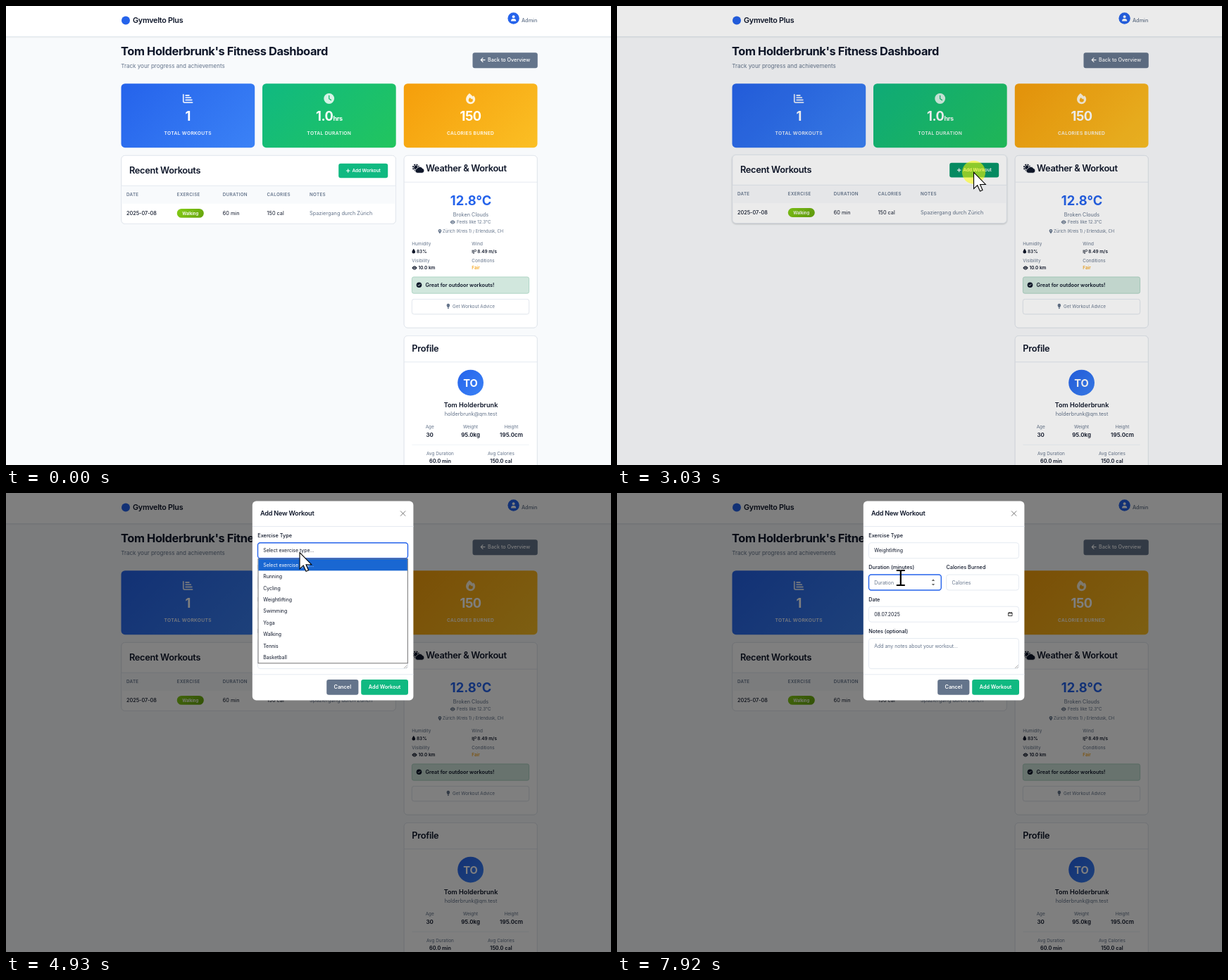
Write an HTML page that moves like this. It is 859 px wide and 652 px high and loops after 8 s.

```html
<!DOCTYPE html>
<html lang="en">
<head>
<meta charset="utf-8">
<title>Fitness Dashboard</title>
<style>
html, body { margin: 0; width: 100%; height: 100%; overflow: hidden; background: #f8fafc; }
svg { display: block; font-family: Inter, sans-serif; font-optical-sizing: none; fill: #0f172a; }
text { white-space: pre; }
.w5 { font-weight: 500; } .w6 { font-weight: 600; } .w7 { font-weight: 700; }
.mid { text-anchor: middle; }
.tight { letter-spacing: -.025em; } .wide { letter-spacing: .05em; }
.grey { fill: #64748b; } .white { fill: #fff; } .blue { fill: #2563eb; } .amber { fill: #f59e0b; }
.line { fill: none; stroke: #e2e8f0; stroke-width: .9; }
.box { fill: #fff; stroke: #e2e8f0; stroke-width: .9; }
.card > .box { filter: drop-shadow(0 .5px .7px #0002); }
.card.up { transform: translateY(-.9px); }
.card.up > .box { filter: drop-shadow(0 1.8px 1.2px #0003); }
.ring { stroke: #2563eb; stroke-width: 1.4; }
.pen { fill: none; stroke-linecap: round; stroke-linejoin: round; }
</style>
</head>
<body>
<svg id="stage" width="859" height="652" viewBox="0 0 859 652"></svg>
<script>
const stage = document.getElementById('stage');
const LOOP = 8000;

const text = (x, y, size, cls, s, more = '') =>
  `<text x="${x}" y="${y}" font-size="${size}" class="${cls}" ${more}>${s}</text>`;
const rect = (x, y, w, h, r, attrs) =>
  `<rect x="${x}" y="${y}" width="${w}" height="${h}" rx="${r}" ${attrs}/>`;
const circle = (x, y, r, attrs = '') => `<circle cx="${x}" cy="${y}" r="${r}" ${attrs}/>`;
const path = (d, attrs = '') => `<path d="${d}" ${attrs}/>`;
const pen = (d, color, width) => path(d, `class="pen" stroke="${color}" stroke-width="${width}"`);
const hline = (x, y, w) => path(`M${x} ${y}h${w}`, 'class="line"');

// Diagonal gradient box with 45 degree colour bands
let gradients = 0;
function gradientBox(x, y, w, h, r, from, to) {
  const id = 'grad' + gradients++, cx = x + w / 2, cy = y + h / 2, d = (w + h) / 4;
  return `<linearGradient id="${id}" gradientUnits="userSpaceOnUse" x1="${cx - d}" y1="${cy - d}"
    x2="${cx + d}" y2="${cy + d}"><stop stop-color="${from}"/><stop offset="1" stop-color="${to}"/></linearGradient>`
    + rect(x, y, w, h, r, `fill="url(#${id})"`);
}

const eye = (x, y, color) =>
  path(`M${x - 3.7} ${y}q3.7-5.6 7.4 0q-3.7 5.6-7.4 0z`, `fill="${color}"`)
  + circle(x, y, 1.6, 'fill="#fff"') + circle(x, y, .9, `fill="${color}"`);

const stat = (x, from, to, label, value) =>
  gradientBox(x, 110.2, 189.7, 91, 5.5, from, to)
  + text(x + 94.8, 163.4, 18.3, 'w7 white mid tight', value)
  + text(x + 94.8, 183.3, 6.7, 'w6 white mid wide', label, 'opacity=".92"');

const header = () =>
  rect(-5, -5, 869, 48.5, 0, 'class="box" style="filter:drop-shadow(0 .5px 1px #0002)"')
  + circle(170, 20.5, 6, 'class="blue"')
  + text(180, 24.4, 10.8, 'w6 tight', 'Gymvelto Plus')
  + circle(720.6, 17.5, 8.2, 'class="blue"')
  + circle(720.6, 15.2, 1.9, 'class="white"')
  + path('M717 21.4q0-3.4 3.6-3.4t3.6 3.4z', 'class="white"')
  + text(732, 23.3, 7.3, 'w5 grey', 'Admin')
  + text(163, 70.2, 16.45, 'w7 tight', "Tom Holderbrunk's Fitness Dashboard")
  + text(163.2, 87.6, 8.04, 'grey', 'Track your progress and achievements')
  + rect(662.5, 66.3, 92.3, 21.9, 3.2, 'class="grey"')
  + pen('M680 76.6h-5.5M677 73.8l-2.8 2.8l2.8 2.8', '#fff', 1.2)
  + text(684, 79.2, 7.2, 'w5 white', 'Back to Overview');

const stats = () =>
  stat(163.5, '#2563eb', '#3b82f6', 'TOTAL WORKOUTS', '1')
  + `<g opacity=".85">${pen('M251.8 125.8v9.5q0 1.8 1.8 1.8h11M255.2 127h4.6M255.2 130.2h7M255.2 133.5h8.6', '#fff', 1.8)}</g>`
  + stat(364, '#10b981', '#22c55e', 'TOTAL DURATION', '1.0<tspan font-size="9.14" style="letter-spacing:-.46px">hrs</tspan>')
  + circle(458.7, 131.5, 7.4, 'fill="#fff" opacity=".82"')
  + pen('M458.7 127.3v4.4l2.8 1.9', '#18bd75', 1.3)
  + stat(564.8, '#f59e0b', '#fbbf24', 'CALORIES BURNED', '150')
  + path('M658 124q3 2.5 4.8 4.6l1.2-1.3q2.2 2.5 2.2 5.3a6.6 6.6 0 0 1-13.2 0q0-4.500 5-8.600z', 'fill="#fff" opacity=".85"')
  + path('M659.7 136.500a3 3 0 0 1-3-3q0-1.500 2-3.600l2.200 2.600l1-1.100q1 1.200 1 2.400a3 3 0 0 1-3.200 2.700z', 'fill="#f7aa14"');

const recent = () =>
  rect(163.9, 212.4, 389.4, 97, 5, 'class="box"')
  + text(175, 238.2, 12.8, 'w6 tight', 'Recent Workouts')
  + rect(472.2, 223.7, 70, 20.6, 3, 'id="add" fill="#10b981"')
  + pen('M483.400 234h4.600M485.700 231.700v4.600', '#fff', 1.1)
  + text(491.4, 236.200, 6.4, 'w6 white', 'Add Workout')
  + rect(164.4, 255.3, 388.5, 25.5, 0, 'fill="#f8fafc"') + hline(164, 255.300, 389)
  + [[171, 'DATE'], [242.800, 'EXERCISE'], [307.800, 'DURATION'], [370.600, 'CALORIES'], [431, 'NOTES']]
    .map(([x, s]) => text(x, 270.200, 6.25, 'w6 grey wide', s)).join('')
  + text(171, 297, 7.3, 'w5', '2025-07-08')
  + gradientBox(242.800, 288, 38, 12.800, 6.4, '#84cc16', '#65a30d')
  + text(261.700, 296.600, 5.9, 'w6 white mid', 'Walking')
  + text(307.800, 297, 7.3, '', '60 min') + text(370.600, 297, 7.3, '', '150 cal')
  + text(431, 297, 7.3, 'grey', 'Spaziergang durch Zürich');

const weather = () =>
  rect(565.2, 212.4, 189, 244.600, 5, 'class="box"') + hline(565.2, 250.200, 189)
  + circle(582, 229.500, 2.700) + circle(582, 229.500, 4.100, 'fill="none" stroke="#0f172a" stroke-width="2" stroke-dasharray="2 1.22"')
  + path('M584 237.300a3.300 3.300 0 0 1-.5-6.500a4.300 4.300 0 0 1 7.600-.4a3.500 3.500 0 0 1-.2 6.900z', 'stroke="#fff" stroke-width=".8"')
  + text(596, 235.300, 12.800, 'w6 tight', 'Weather &amp; Workout')
  + text(660, 282.600, 18.300, 'w7 blue mid', '12.8°C')
  + text(660, 299, 7.3, 'grey mid', 'Broken Clouds')
  + eye(634.200, 307, '#64748b') + text(640, 309.300, 6.300, 'grey', 'Feels like 12.3°C')
  + path('M616 323.500q-2.300-2.900-2.300-4.200a2.300 2.300 0 0 1 4.600 0q0 1.300-2.300 4.200z', 'class="grey"')
  + circle(616, 319.200, .8, 'class="white"')
  + text(620, 322.300, 5.85, 'grey', 'Zürich (Kreis 1) / Erlendusk, CH')
  + text(576.300, 340, 6.4, 'grey', 'Humidity') + text(661.300, 340, 6.4, 'grey', 'Wind')
  + path('M578.800 344.700q2.400 3 2.400 4.500a2.400 2.400 0 0 1-4.800 0q0-1.500 2.400-4.500z')
  + text(583, 350.500, 6.4, 'w6', '83%')
  + pen('M661.800 347.200h2.800M661.800 348.700h4.500a1.300 1.300 0 1 0-1-2M661.800 350.200h2.200a.7 .7 0 1 1-.6 1.100', '#0f172a', .8)
  + text(669.300, 350.500, 6.4, 'w6', '8.49 m/s')
  + text(576.300, 363.800, 6.4, 'grey', 'Visibility') + text(661.300, 363.800, 6.4, 'grey', 'Conditions')
  + eye(580, 372, '#0f172a') + text(585.500, 374.300, 6.4, 'w6', '10.0 km')
  + text(661.300, 374.300, 6.4, 'w5 amber', 'Fair')
  + rect(576.400, 384.900, 166.200, 23.300, 2.500, 'fill="#d1e7dd" stroke="#a3cfbb" stroke-width=".8"')
  + circle(586.500, 396.200, 3.800) + pen('M584.900 396.300l1.200 1.200l2.100-2.400', '#d1e7dd', .9)
  + text(595.500, 398.900, 7.3, 'w6', 'Great for outdoor workouts!')
  + rect(576.400, 416.500, 166.200, 21.200, 3, 'class="box"')
  + path('M626.700 428.200q0-1.200-.8-2a2.300 2.300 0 1 1 4 0q-.8 .8-.8 2zM626.800 428.800h2.200q0 1.400-1.100 1.400t-1.100-1.400z', 'class="grey"')
  + text(634, 429.200, 6.350, 'grey', 'Get Workout Advice');

const fact = (x, y, dy, size, label, value) =>
  text(x, y, 6.4, 'grey mid', label) + text(x, y + dy, size, 'w6 mid', value);

const profile = () =>
  rect(565.2, 468.5, 189, 210, 5, 'class="box"') + hline(565.2, 505.700, 189)
  + text(576.300, 491.300, 12.800, 'w6 tight', 'Profile')
  + gradientBox(641.2, 516.700, 36.800, 36.800, 18.400, '#2563eb', '#3b82f6')
  + text(659.600, 540.700, 14.620, 'w7 white mid', 'TO')
  + text(660, 570, 9.140, 'w6 mid', 'Tom Holderbrunk')
  + text(660, 582.300, 7.3, 'grey mid', 'holderbrunk@qm.test')
  + fact(601.700, 600, 11.700, 8.040, 'Age', '30') + fact(659.600, 600, 11.700, 8.040, 'Weight', '95.0kg')
  + fact(717.500, 600, 11.700, 8.040, 'Height', '195.0cm')
  + path('M576.400 623.300h166.200', 'class="line" opacity=".6"')
  + fact(616.500, 638.200, 10.800, 7.3, 'Avg Duration', '60.0 min')
  + fact(703, 638.200, 10.800, 7.3, 'Avg Calories', '150.0 cal');

const field = (id, x, y, w, h) => rect(x, y, w, h, 3.5, `id="${id}" class="box"`);
const options = ['Select exercise type...', 'Running', 'Cycling', 'Weightlifting', 'Swimming',
  'Yoga', 'Walking', 'Tennis', 'Basketball'];
const ROW = 16.4, LIST_TOP = 93.9;

const modal = () =>
  rect(349.8, 11.6, 228.600, 282.800, 5.5, 'class="white"')
  + text(361, 32.300, 9.140, 'w6 tight', 'Add New Workout')
  + pen('M560.300 25.800l6.600 6.600M566.900 25.800l-6.600 6.600', '#777', 1)
  + hline(350, 47.500, 228.500) + hline(350, 257.800, 228.500)
  + [[357.300, 62.900, 'Exercise Type'], [357.300, 108.300, 'Duration (minutes)'], [467.500, 108.300, 'Calories Burned'],
     [357.300, 153.900, 'Date'], [357.300, 199, 'Notes (optional)']]
    .map(([x, y, s]) => text(x, y, 7.3, 'w5', s)).join('')
  + field('select', 357.500, 70.700, 213, 22.100) + text(365.200, 84.300, 6.950, '', options[0], 'id="choice"')
  + field('duration', 357.500, 116, 102.800, 22) + text(365.200, 129.500, 6.950, 'grey', 'Duration')
  + path('M446.800 125l2.200-2.700l2.200 2.700zM446.800 128.900l2.200 2.700l2.200-2.700z', 'fill="#666"')
  + path('M365.200 122.500v9', 'id="caret" stroke="#0f172a" stroke-width=".7"')
  + field('calories', 467.700, 116, 102.800, 22) + text(475.500, 129.500, 6.950, 'grey', 'Calories')
  + field('date', 357.500, 161.200, 213, 22) + text(365.200, 174.700, 6.950, '', '08.07.2025')
  + pen('M556 170.200h5v4.300h-5zM557.200 169.300v.6M559.800 169.300v.6M556 170.700h5', '#111', .8)
  + field('notes', 357.500, 206.600, 213, 43) + text(365.200, 219.800, 6.950, 'grey', 'Add any notes about your workout...')
  + pen('M565.300 248.700l4.200-4.200M567.800 248.700l1.700-1.700', '#777', .6)
  + rect(455.2, 264.900, 45.200, 21.800, 3.200, 'class="grey"') + text(477.800, 277.800, 7.300, 'w6 white mid', 'Cancel')
  + rect(504.2, 264.900, 66.800, 21.800, 3.200, 'fill="#10b981"') + text(537.600, 277.800, 7.200, 'w6 white mid', 'Add Workout')
  + '<g id="list">' + rect(358, 93.600, 212.300, 148.200, 0, 'fill="#fff" stroke="#666" stroke-width=".9"')
  + rect(358.400, LIST_TOP, 211.500, ROW, 0, 'id="mark" fill="#1967d2"')
  + options.map((s, i) => text(365.200, LIST_TOP + 10.800 + i * ROW, 6.950, 'option', s)).join('') + '</g>';

const beamSide = s => `M${6 * s}-10.500H${1.5 * s}Q0-10.500 0-9V9Q0 10.500 ${1.5 * s} 10.500H${6 * s}`;
const pointers = () =>
  circle(0, 0, 16.6, 'id="flash" fill="#ff0" opacity=".55"')
  + path('M0 0V23.300L5.200 18.400L9 26.800L12.500 25.300L9 17.200H16.800Z', 'id="arrow" fill="#fff" stroke="#000" stroke-width="1.1"')
  + path('M-1 18V2.500C-1-.8 3.300-.8 3.300 2.500V11C4 9.500 7.200 9.800 7.300 12C8.500 10.700 11 11.300 11.300 13.500C12.500 12.500 15 13.300 15 15.800V22C15 28 11.500 31 6 31C1 31-1.500 29.500-4 25.500L-8.600 18C-9 15.800-6 14.800-4.300 16.300ZM3.300 11v5M7.300 12v4.500M11.300 13.500v4',
    'id="hand" fill="#fff" stroke="#000" stroke-width="1.1" stroke-linejoin="round"')
  + path(beamSide(-1) + beamSide(1), 'id="beam" fill="none" stroke="#000" stroke-width="2.2"');

const card = (id, content) => `<g id="${id}" class="card">${content}</g>`;
stage.innerHTML = rect(0, 0, 859, 652, 0, 'fill="#f8fafc"') + header() + stats()
  + card('recent', recent()) + card('weather', weather()) + card('profile', profile())
  + rect(0, 0, 859, 652, 0, 'id="shade" fill="#000"')
  + `<g id="modal">${modal()}</g><g id="pointer">${pointers()}</g>`;

const ui = {};
stage.querySelectorAll('[id]').forEach(el => ui[el.id] = el);
const rows = [...stage.querySelectorAll('.option')];

const linear = p => p, smooth = p => p * p * (3 - 2 * p), easeOut = p => 1 - (1 - p) ** 2;
// Pointer stops: time, x, y and the easing used to get there
const stops = [
  [640, 830, 427, linear], [1180, 273, 349.5, easeOut],
  [1900, 273, 349.5, linear], [2790, 506, 236, smooth],
  [3700, 508, 237, linear], [4070, 417.4, 118.4, linear], [4460, 417, 84.5, easeOut],
  [5400, 417, 84.5, linear], [5900, 399, 144, linear], [6030, 397, 150.5, easeOut],
  [6930, 397, 150.5, linear], [7500, 400, 127.5, smooth],
  [7919, 400, 127.5, linear], [7920, 402.800, 120.5, linear], [LOOP, 402.800, 120.5, linear]
];
const clicks = [[3030, 3250], [4780, 4930], [6360, 6500], [7430, 7500]];
const cardBoxes = { recent: [164, 212, 553, 309], weather: [565, 212, 754, 457], profile: [565, 468, 754, 652] };

const within = (t, [from, to]) => t >= from && t < to;
const show = (el, on) => el.setAttribute('visibility', on ? 'inherit' : 'hidden');

function pointerAt(t) {
  const i = Math.max(1, stops.findIndex(s => s[0] >= t));
  const [t0, x0, y0] = stops[i - 1], [t1, x1, y1, ease] = stops[i];
  const p = ease(Math.max(0, (t - t0) / (t1 - t0)));
  return [x0 + (x1 - x0) * p, y0 + (y1 - y0) * p];
}

function draw(t) {
  const [x, y] = pointerAt(t);
  const open = t >= 3250, listOpen = within(t, [4780, 6500]), typing = t >= 7430;

  for (const id in cardBoxes) {
    const [l, top, r, b] = cardBoxes[id];
    ui[id].classList.toggle('up', within(t, [660, 3250]) && x > l && x < r && y > top && y < b);
  }
  ui.add.setAttribute('fill', within(t, [2820, 3250]) ? '#059669' : '#10b981');

  ui.shade.setAttribute('opacity', t < 3030 ? 0 : open ? .5 : .08);
  const [fade, rise] = t < 3460 ? [.45, -10] : t < 3580 ? [.95, -1] : [1, 0];
  show(ui.modal, open);
  ui.modal.setAttribute('opacity', fade);
  ui.modal.setAttribute('transform', `translate(0 ${rise})`);

  ui.select.classList.toggle('ring', t >= 4780 && !typing);
  ui.duration.classList.toggle('ring', typing);
  show(ui.caret, typing && t < 7920);
  ui.choice.textContent = t < 6500 ? options[0] : options[3];

  const active = Math.max(0, Math.floor((y - 2 - LIST_TOP) / ROW));
  show(ui.list, listOpen);
  ui.mark.setAttribute('y', LIST_TOP + active * ROW);
  rows.forEach((row, i) => row.classList.toggle('white', i === active));

  const overField = y > 206 && y < 250 || y > 161 && y < 183 || y > 116 && y < 138;
  const beam = open && !listOpen && overField, hand = within(t, [2740, 3030]);
  show(ui.pointer, t >= 660);
  ui.pointer.setAttribute('transform', `translate(${x} ${y})`);
  show(ui.flash, clicks.some(c => within(t, c)));
  show(ui.beam, beam);
  show(ui.hand, hand);
  show(ui.arrow, !beam && !hand);
}

const start = performance.now();
function tick() {
  draw((performance.now() - start) % LOOP);
  requestAnimationFrame(tick);
}
tick();
</script>
</body>
</html>
```
